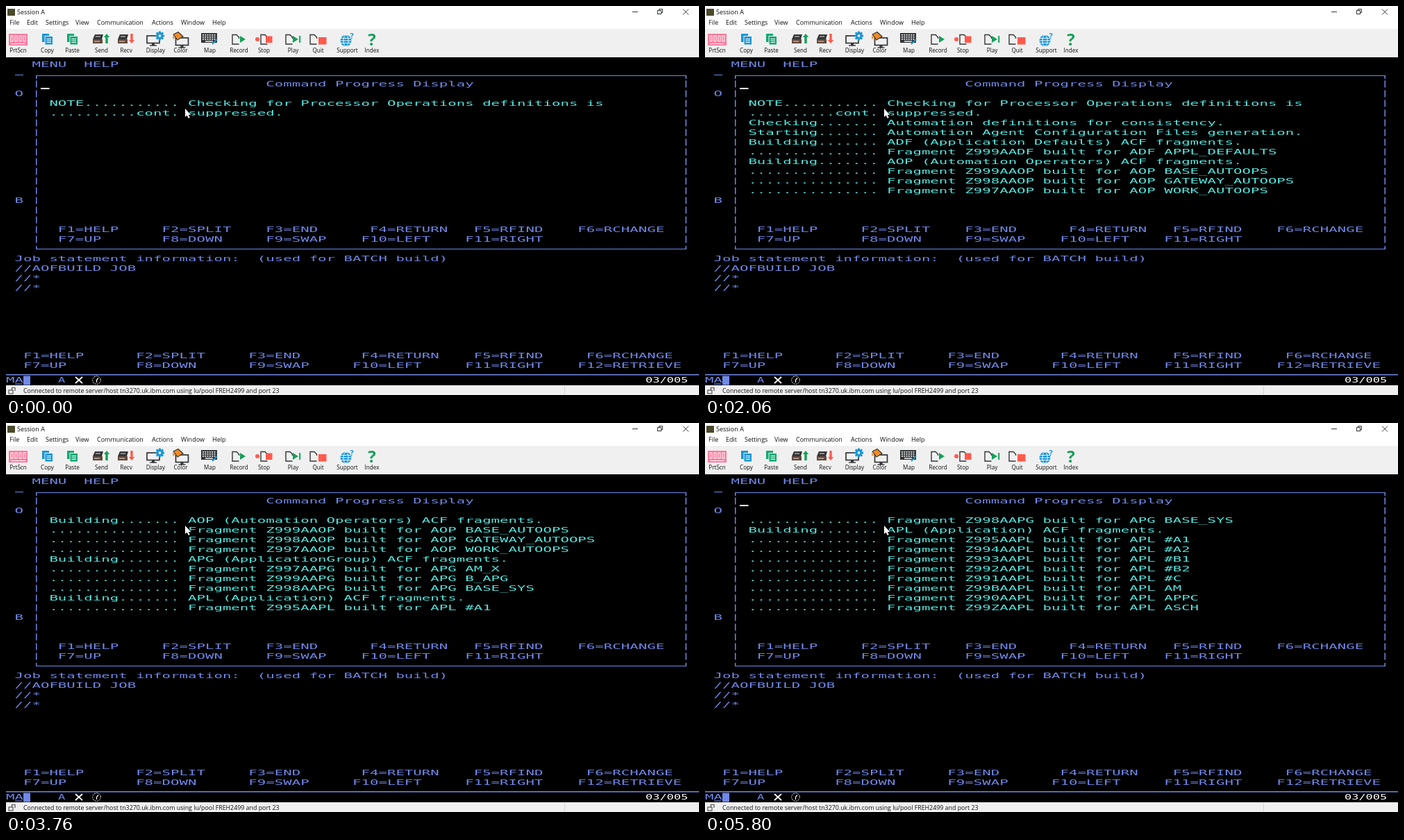
An HTML page with a canvas that plays this animation: 998x561 px, repeating every 6 s.

```html
<!DOCTYPE html>
<html lang="en">
<head>
<meta charset="utf-8">
<title>Session A</title>
<style>
html, body { margin: 0; width: 100%; height: 100%; overflow: hidden; background: #000; }
canvas { display: block; width: 998px; height: 561px; }
</style>
</head>
<body>
<canvas id="stage" width="998" height="561"></canvas>
<script>
const W = 998, H = 561, LOOP = 6000;
const CELL = W / 80, ROW = 14, VISIBLE = 10;
const BLUE = '#7088e8', CYAN = '#52e6de', WHITE = '#fff', DARK = '#333638';
const GREEN = '#14a05a', RED = '#ff5a4c', SKY = '#1896d4', PANEL = '#f0f0f0';
const UI = '"Open Sans", "Noto Sans", sans-serif';

const stage = document.getElementById('stage').getContext('2d');
const backdrop = document.createElement('canvas');
backdrop.width = W;
backdrop.height = H;
let g = backdrop.getContext('2d');

// ---- drawing helpers ----
function box(x, y, w, h, color) {
  g.fillStyle = color;
  g.fillRect(x, y, w, h);
}
function frame(x, y, w, h, color, width = 1.5) {
  g.strokeStyle = color;
  g.lineWidth = width;
  g.strokeRect(x, y, w, h);
}
function line(color, width, ...p) {
  g.strokeStyle = color;
  g.lineWidth = width;
  g.beginPath();
  for (let i = 0; i < p.length; i += 2) g.lineTo(p[i], p[i + 1]);
  g.stroke();
}
function poly(color, ...p) {
  g.fillStyle = color;
  g.beginPath();
  for (let i = 0; i < p.length; i += 2) g.lineTo(p[i], p[i + 1]);
  g.closePath();
  g.fill();
}
function disc(x, y, r, color) {
  g.fillStyle = color;
  g.beginPath();
  g.arc(x, y, r, 0, Math.PI * 2);
  g.fill();
}
function label(str, x, y, size, color = '#111', align = 'left', weight = 400) {
  g.font = `${weight} ${size}px ${UI}`;
  g.textAlign = align;
  g.fillStyle = color;
  g.fillText(str, x, y);
}
// The terminal face is one wide monospace font.
function wide(str, x, y, color, pitch = CELL) {
  g.save();
  g.font = '10px "DejaVu Sans Mono", monospace';
  g.textAlign = 'left';
  g.fillStyle = color;
  g.translate(x, y);
  g.scale(pitch / g.measureText('0').width, 1);
  g.fillText(str, 0, 0);
  g.restore();
}
function term(str, col, row, color = BLUE) {
  wide(str, col * CELL, 88.2 + row * ROW, color);
}

// ---- window chrome ----
function doc(x) {
  g.strokeStyle = DARK;
  g.lineWidth = 1.4;
  g.beginPath();
  g.moveTo(x + 9.5, 55);
  g.lineTo(x, 55);
  g.lineTo(x, 41.5);
  g.lineTo(x + 6, 41.5);
  g.lineTo(x + 9.5, 45);
  g.lineTo(x + 9.5, 47);
  g.stroke();
}
function pages(x, color) {
  box(x, 40, 10, 12, color);
  box(x + 3.5, 43, 12, 13, PANEL);
  box(x + 4.5, 44, 10.5, 11.5, color);
  for (const y of [47, 49.5, 52]) box(x + 6.5, y, 6.5, 1, WHITE);
}
function drive(x) {
  poly(DARK, x + 3, 41, x + 15, 41, x + 13, 48, x, 48);
  box(x, 48, 14, 6, '#65493c');
  line('#e8d9cf', 1, x + 4, 44, x + 11, 44);
  line('#e8d9cf', 1, x + 2, 51, x + 10, 51);
}
function arrow(x, tip, tail, color) {
  const neck = tip + Math.sign(tail - tip) * 5;
  poly(color, x, tip, x + 4.2, neck, x + 1.7, neck, x + 1.7, tail,
    x - 1.7, tail, x - 1.7, neck, x - 4.2, neck);
}
function monitor(x, y) {
  frame(x, y, 18, 10.5, DARK, 1.7);
  box(x + 7, y + 11, 4, 3, DARK);
  box(x + 4, y + 13.3, 10, 1.4, DARK);
}
function toolbar() {
  box(4, 40, 27, 17, '#fb7b9e');
  for (let i = 0; i < 4; i++) frame(7 + i * 6, 43, 3, 8, WHITE, 1);
  box(7, 54, 21, 1, WHITE);

  pages(52, SKY);
  pages(88, '#12a874');

  drive(125);
  arrow(145, 40, 54, GREEN);
  drive(161);
  arrow(181, 54, 40, RED);

  monitor(203, 43);
  g.save();
  g.translate(221.5, 43);
  for (let i = 0; i < 8; i++) {
    box(-1.4, -6.6, 2.8, 4, SKY);
    g.rotate(Math.PI / 4);
  }
  g.restore();
  disc(221.5, 43, 4.9, SKY);
  disc(221.5, 43, 1.9, PANEL);

  monitor(244.5, 46);
  poly('#f08a24', 241, 41, 248, 37.5, 255, 44, 247, 49);
  line(DARK, 1.2, 241, 41, 248, 37.5, 255, 44, 247, 49, 241, 41);
  poly('#f08a24', 240, 42, 243, 46, 240.5, 48);

  box(281, 39, 23, 14, DARK);
  for (let r = 0; r < 3; r++)
    for (let c = 0; c < 6; c++) box(283 + c * 3.3, 41 + r * 3, 1.9, 1.6, WHITE);
  box(287, 50.3, 11, 1.4, WHITE);
  line(SKY, 2, 297, 55, 304, 48);

  doc(326);
  poly(GREEN, 337, 43, 345, 48, 337, 53);
  disc(362, 48, 3, RED);
  doc(367);
  box(374, 43.5, 9.5, 9.5, RED);
  doc(403);
  poly(GREEN, 413, 43, 421, 48, 413, 53);
  box(422.2, 43, 2, 10, GREEN);
  doc(438);
  box(450, 45, 11.5, 10.5, RED);

  disc(489.5, 50, 8, SKY);
  g.strokeStyle = WHITE;
  g.lineWidth = 0.9;
  g.beginPath();
  g.ellipse(489.5, 50, 3.6, 8, 0, 0, Math.PI * 2);
  g.stroke();
  for (const y of [46.5, 50, 53.5]) line(WHITE, 0.9, 481.5, y, 497.5, y);
  label('?', 498, 47, 11, SKY, 'center', 700);
  label('?', 527, 57, 24, GREEN, 'center', 700);

  const names = { PrtScn: 17.5, Copy: 59.5, Paste: 95.5, Send: 137.5, Recv: 173,
    Display: 215.5, Color: 251.5, Map: 293.5, Record: 335.5, Stop: 371.5,
    Play: 413.5, Quit: 449.5, Support: 491.5, Index: 527 };
  for (const [name, x] of Object.entries(names)) label(name, x, 67, 8.1, '#111', 'center');
}
function chrome() {
  box(0, 0, W, 33, WHITE);
  box(0, 33, W, 41, PANEL);
  box(2, 4, 11, 10, '#4b4a2c');
  label('Session A', 16, 12.3, 9);
  const menus = { File: 5, Edit: 30, Settings: 57, View: 100, Communication: 131,
    Actions: 210, Window: 252, Help: 297 };
  for (const [name, x] of Object.entries(menus)) label(name, x, 27.4, 9);

  line(DARK, 1, 902, 8.5, 910, 8.5);
  frame(938.5, 6.5, 5, 5, DARK, 1);
  line(DARK, 1, 940.5, 6, 940.5, 4.5, 945.5, 4.5, 945.5, 9.5, 944, 9.5);
  line(DARK, 1, 975, 4.5, 983, 12.5);
  line(DARK, 1, 983, 4.5, 975, 12.5);
  toolbar();
}

// ---- terminal screen ----
function keys(cols, row, names) {
  names.split(' ').forEach((name, i) => term(name, cols[i], row));
}
function panel() {
  term('MENU', 3, 0);
  term('HELP', 9, 0);
  box(13, 99, 12, 1, BLUE);
  term('O', 1, 3);
  term('B', 1, 14);

  const left = 43, right = 978.5, top = 100, bottom = 350;
  for (const y of [top, bottom]) box(left, y, right - left + 1.5, 1, BLUE);
  for (const x of [left, right]) {
    box(x, top, 1.5, 5, BLUE);
    box(x, bottom - 4, 1.5, 5, BLUE);
    for (let r = 2; r < 19; r++) box(x, 79.5 + r * ROW, 1.5, 10, BLUE);
  }
  term('Command Progress Display', 30, 2);
  keys([6, 18, 30, 42, 54, 66], 17, 'F1=HELP F2=SPLIT F3=END F4=RETURN F5=RFIND F6=RCHANGE');
  keys([6, 18, 30, 41, 53], 18, 'F7=UP F8=DOWN F9=SWAP F10=LEFT F11=RIGHT');

  term('Job statement information:  (used for BATCH build)', 1, 20);
  term('//AOFBUILD JOB', 1, 21);
  term('//*', 1, 22);
  term('//*', 1, 23);
  keys([2, 15, 28, 41, 54, 67], 30, 'F1=HELP F2=SPLIT F3=END F4=RETURN F5=RFIND F6=RCHANGE');
  keys([2, 15, 28, 40, 53, 66], 31, 'F7=UP F8=DOWN F9=SWAP F10=LEFT F11=RIGHT F12=RETRIEVE');
}
function status() {
  box(0, 531, W, 1.5, BLUE);
  wide('MA', 0, 543, BLUE);
  box(13, 544.5, 10, 1.2, BLUE);
  box(25, 533.5, 10, 13, BLUE);
  wide('A', 75, 543, BLUE, 10.3);
  line(WHITE, 1.8, 100, 535, 110, 544);
  line(WHITE, 1.8, 110, 535, 100, 544);
  g.setLineDash([2, 1.3]);
  g.strokeStyle = WHITE;
  g.lineWidth = 1;
  g.beginPath();
  g.arc(130.5, 539.5, 5.8, 0, Math.PI * 2);
  g.stroke();
  g.setLineDash([]);
  line(WHITE, 1.2, 133, 536.5, 130.5, 539.5, 130.5, 543);
  wide('03/005', 921, 543, WHITE, 10.2);

  box(0, 547, W, 14, PANEL);
  box(804, 548, 1, 13, '#d4d4d4');
  frame(4, 554, 6, 5, '#555', 1.2);
  line('#555', 1.2, 8.5, 554, 8.5, 550.5, 13, 550.5, 13, 555);
  label('Connected to remote server/host tn3270.uk.ibm.com using lu/pool FREH2499 and port 23',
    25, 558.3, 8.83);
}
function pointer() {
  const shape = [258, 148, 258, 160, 260.7, 157.7, 262.8, 162, 264.8, 161, 262.8, 157, 266.3, 157];
  line('#000', 1.6, ...shape, 258, 148);
  poly(WHITE, ...shape);
}

// ---- progress log ----
const entry = (head, text) => head.padEnd(15, '.') + ' ' + text;
const building = (kind, name) => entry('Building', `${kind} (${name}) ACF fragments.`);
const fragments = (kind, list) => list.split(' ').map(item => {
  const [id, name] = item.split(':');
  return entry('', `Fragment Z99${id}A${kind} built for ${kind} ${name}`);
});
const log = [
  entry('NOTE', 'Checking for Processor Operations definitions is'),
  entry('..........cont.', 'suppressed.'),
  entry('Checking', 'Automation definitions for consistency.'),
  entry('Starting', 'Automation Agent Configuration Files generation.'),
  building('ADF', 'Application Defaults'),
  ...fragments('ADF', '9:APPL_DEFAULTS'),
  building('AOP', 'Automation Operators'),
  ...fragments('AOP', '9:BASE_AUTOOPS 8:GATEWAY_AUTOOPS 7:WORK_AUTOOPS'),
  building('APG', 'ApplicationGroup'),
  ...fragments('APG', '7:AM_X 9:B_APG 8:BASE_SYS'),
  building('APL', 'Application'),
  ...fragments('APL', '5:#A1 4:#A2 3:#B1 2:#B2 1:#C B:AM 0:APPC Z:ASCH')
];
// When each line after the first two arrives.
const arrivals = [130, 330, 530, 960, 1230, 1530, 1800, 2060, 2360, 2430, 2960,
  3200, 3530, 3760, 4060, 4100, 4560, 4900, 5200, 5500, 5760];
// Spans in which the text cursor is hidden.
const hidden = [[130, 160], [530, 700], [1230, 1260], [1530, 1560], [2360, 2530], [3200, 3230],
  [3760, 3830], [4060, 4160], [4560, 4660], [4900, 4960], [5500, 5530], [5760, 5800]];

box(0, 0, W, H, '#000');
chrome();
panel();
status();
g = stage;

function draw(now) {
  const t = now % LOOP;
  const count = 2 + arrivals.filter(a => a <= t).length;
  g.drawImage(backdrop, 0, 0);
  log.slice(Math.max(0, count - VISIBLE), count).forEach((text, i) => term(text, 5, 4 + i, CYAN));
  if (!hidden.some(([from, to]) => t >= from && t < to)) box(50, 118, 12.5, 2, WHITE);
  pointer();
}
let start;
function tick(now) {
  start ??= now;
  draw(now - start);
  requestAnimationFrame(tick);
}
draw(0);
requestAnimationFrame(tick);
</script>
</body>
</html>
```
